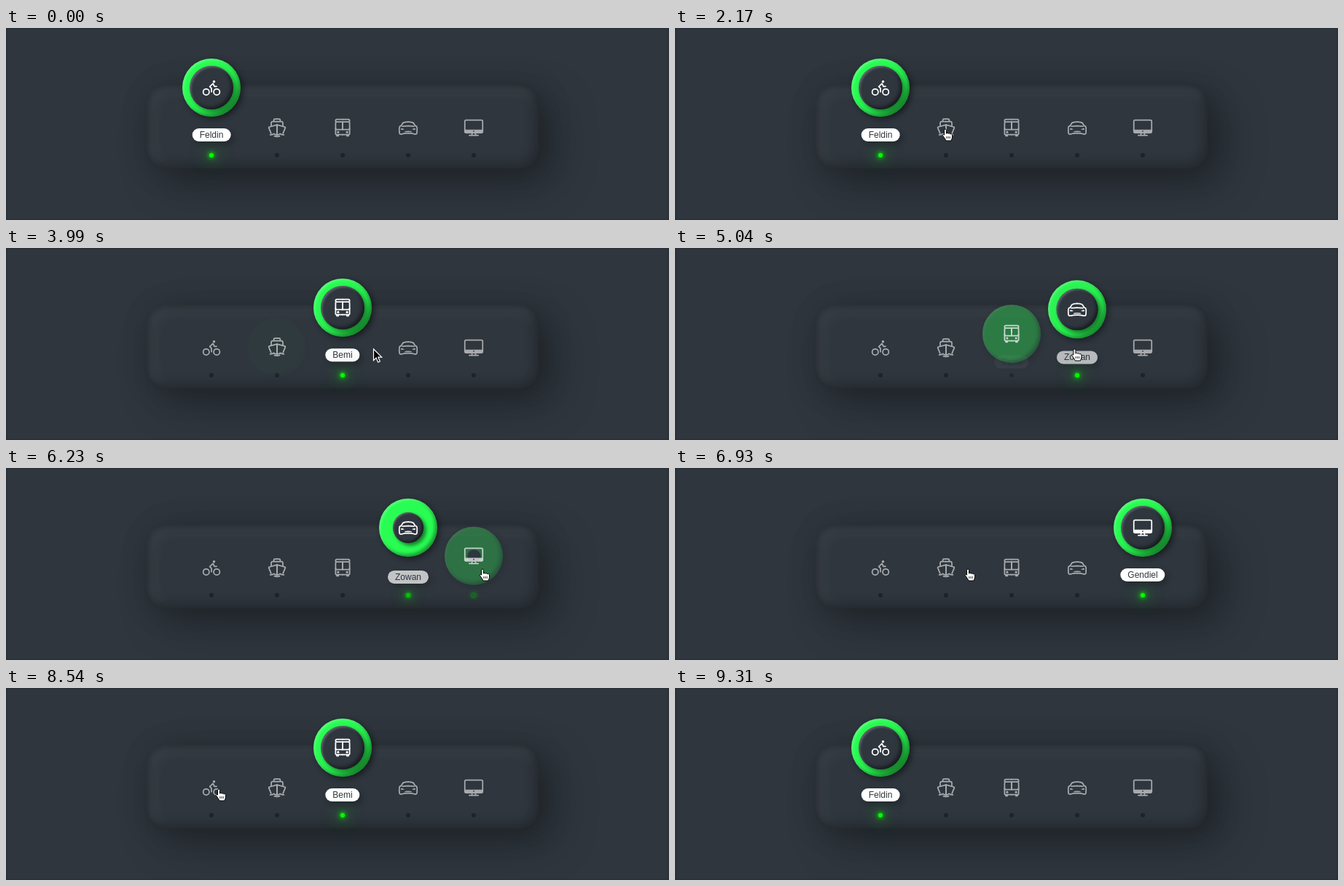
Recreate the animation shown at these times as an HTML page. Size 910 by 264 pixels, loop 9.73 s.

```html
<!DOCTYPE html>
<html lang="en">
<head>
<meta charset="utf-8">
<title>Dock menu</title>
<style>
  html, body { margin: 0; width: 100%; height: 100%; overflow: hidden; background: #2f363e; }
  .stage { position: relative; width: 910px; height: 264px; overflow: hidden; background: #2f363e;
    box-shadow: inset 0 0 3px rgba(0,0,0,.3); }
  .panel { position: absolute; left: 193px; top: 78px; width: 538px; height: 115px; border-radius: 25px;
    background: #2f363e;
    box-shadow: 22px 22px 60px rgba(0,0,0,.25), 6px 6px 40px rgba(0,0,0,.2),
      inset 3px 3px 8px rgba(0,0,0,.22), inset 5px 5px 24px rgba(255,255,255,.08),
      inset -5px -5px 15px rgba(0,0,0,.35); }
  .item, .item > *, .ring, .core, .icon { position: absolute; }
  .item { top: 0; width: 0; height: 264px; }
  .label { left: 0; top: 138px; height: 18px; padding: 0 10px; border-radius: 9px; background: #fff;
    color: #2f363e; font: 12px/18px "Liberation Sans", Arial, sans-serif; white-space: nowrap;
    box-shadow: 4px 4px 8px rgba(0,0,0,.25); }
  .dot { left: -3px; top: 171.5px; width: 6px; height: 6px; border-radius: 50%; }
  .mover { left: 0; top: 137px; }
  .ring { left: -40px; top: -40px; width: 80px; height: 80px; border-radius: 50%; background: #29fd53;
    box-shadow: 3px 3px 8px rgba(0,0,0,.45), inset 2px 2px 3px rgba(255,255,255,.25),
      inset -3px -3px 5px rgba(0,0,0,.4); }
  .core { left: 10px; top: 10px; width: 60px; height: 60px; border-radius: 50%; background: #2f363e;
    box-shadow: 5px 5px 8px rgba(0,0,0,.5), inset 2px 2px 3px rgba(255,255,255,.25),
      inset -3px -3px 5px rgba(0,0,0,.5); }
  .icon { left: -14px; top: -14px; width: 28px; height: 28px; fill: none; stroke: #fff; stroke-width: 32;
    stroke-linecap: round; stroke-linejoin: round; }
  .icon .solid { fill: #fff; stroke: none; }
  .cursor { position: absolute; left: 0; top: 0; width: 910px; height: 264px; }
</style>
</head>
<body>
<div class="stage" id="stage"><div class="panel"></div></div>
<script>
const LOOP = 9730, STEP = 70;
const DURATION = 500, DELAY = 180, RISE = 55;
const LEAVE = 280, TRAVEL = 620, POINTER_Y = 139;

// Draws the left half of a symmetric icon and its reflection.
const mirror = half => `${half}<g transform="matrix(-1 0 0 1 512 0)">${half}</g>`;

const menu = [
  ['Feldin', `<circle cx="388" cy="364" r="76"/><circle cx="124" cy="364" r="76"/>
    <path d="M256 360v-86l-42-42 80-80 36 72h54"/><circle class="solid" cx="320" cy="104" r="32"/>`],
  ['Pelno', mirror(`<path d="M256 40h-56q-24 0-24 24v40M256 104H150q-40 0-40 40v70"/>
    <path d="M256 186L66 238q-22 6-16 26l56 136M256 186v226"/>
    <path d="M84 436q54 0 94-26 36 30 78 30M190 468q30 12 66 12"/>`)],
  ['Bemi', mirror(`<path d="M256 48H112a32 32 0 0 0 0 64h144v192H112q-32 0-32-32V144q0-32 32-32"/>
    <path d="M80 272v128q0 32 32 32h144M112 432v32h36v-32"/>
    <circle class="solid" cx="144" cy="368" r="28"/>`)],
  ['Zowan', mirror(`<path d="M256 112c-30 0-88 4-117 18s-38 50-50 68-40 20-47 34-11 46-10 86
      q2 60 8 84 4 14 20 14h40c24 0 16-20 156-20M256 214q-90 0-144 10"/>
    <path class="solid" d="M78 268q50 4 82 28-10 16-82 14zM256 340q-70 0-84 12l-12 20q50-8 96-8z"/>`)],
  ['Gendiel', `<rect x="32" y="64" width="448" height="320" rx="32"/>
    <path d="M304 448l-8-64h-80l-8 64M368 448H144"/>
    <path class="solid" fill-rule="evenodd" d="M32 304v80h448v-80zM256 330a16 16 0 1 1 0 32 16 16 0 0 1 0-32z"/>`]
];

// What is chosen when, where the pointer rests on it, and how far it swings wide afterwards.
const clicks = [
  { time: 0, item: 0 },
  { time: 2170, item: 1, dx: 0 },
  { time: 3400, item: 2, dx: 4 },
  { time: 4670, item: 3, dx: -9 },
  { time: 6130, item: 4, dx: 13, swing: -130 },
  { time: 7330, item: 2, dx: -10 },
  { time: 8540, item: 0, dx: 11 }
];

const stage = document.getElementById('stage');
const centre = i => 282 + 90 * i;

const rests = clicks.slice(1).map(c => ({ x: centre(c.item) + c.dx, y: POINTER_Y }));
const stops = [{ x: 425, y: 275 }, ...rests, { x: 345, y: 310 }];

const items = menu.map(([name, art], i) => {
  const el = document.createElement('div');
  el.className = 'item';
  el.style.left = centre(i) + 'px';
  el.innerHTML = `<div class="label">${name}</div><div class="dot"></div>
    <div class="mover"><div class="ring"><div class="core"></div></div>
    <svg class="icon" viewBox="0 0 512 512">${art}</svg></div>`;
  stage.append(el);
  const part = {};
  for (const key of ['label', 'dot', 'mover', 'ring', 'core', 'icon'])
    part[key] = el.querySelector('.' + key).style;
  return part;
});

stage.insertAdjacentHTML('beforeend', `<svg class="cursor">
  <g id="hand" fill="#fff" stroke="#000" stroke-linejoin="round">
    <path d="M-1 0q1.500 0 1.500 1.500V6q2-1.500 2.700.2 2-1.200 2.700.6 2-1 2.600 1v3q0 2-1.500 5.200H0
      q-1-2.500-4.700-7.300 0-2.500 2.200-.6V1.500Q-2.500 0-1 0z"/>
    <path d="M.8 10v3M3 10v3M5.200 10v3" stroke-width=".8"/>
  </g>
  <path id="arrow" d="M0 0v15.500l3.600-3.400 2.500 5.900 2.700-1.100-2.500-5.800h4.900z" stroke="#fff" stroke-width="1.2"/>
</svg>`);
const hand = document.getElementById('hand');
const arrow = document.getElementById('arrow');

const mix = (a, b, p) => a + (b - a) * p;
const clamp = x => Math.min(1, Math.max(0, x));
const smooth = u => u * u * (3 - 2 * u);
const bezier = (a, b, u) => 3 * a * u * (1 - u) ** 2 + 3 * b * u * u * (1 - u) + u ** 3;

// The CSS "ease" curve.
function ease(x) {
  x = clamp(x);
  let lo = 0, hi = 1;
  for (let n = 0; n < 24; n++) {
    const mid = (lo + hi) / 2;
    if (bezier(.25, .25, mid) < x) lo = mid; else hi = mid;
  }
  return bezier(.1, 1, hi);
}

function drawItems(t, k) {
  const { time, item } = clicks[k];
  const previous = k ? clicks[k - 1].item : -1;
  const run = delay => k ? ease((t - time - delay) / DURATION) : 1;

  items.forEach((part, i) => {
    const amount = (inDelay, outDelay) =>
      i === item ? run(inDelay) : i === previous ? 1 - run(outDelay) : 0;
    const lift = amount(0, DELAY), glow = amount(0, 0), tag = amount(DELAY, 0);

    part.mover.transform = `translateY(${-RISE * lift}px)`;
    part.ring.opacity = lift;
    part.core.transform = `scale(${glow})`;
    part.icon.opacity = mix(.58, 1, lift);
    part.label.opacity = tag;
    part.label.transform = `translate(-50%, ${10 * (1 - tag)}px)`;
    part.dot.background = `rgb(${mix(30, 0, glow)},${mix(35, 255, glow)},${mix(42, 0, glow)})`;
    part.dot.boxShadow = [5, 10, 20, 30]
      .map(blur => `0 0 ${blur * glow}px rgba(0,255,0,${glow})`).join();
  });
}

function drawCursor(t, k) {
  const u = clamp((t - clicks[k].time - LEAVE) / TRAVEL), p = smooth(u);
  const from = stops[k], to = stops[k + 1];
  const x = mix(from.x, to.x, p) + (clicks[k].swing || 0) * Math.sin(Math.PI * u);
  const y = mix(from.y, to.y, p);
  const over = items.some((_, i) => Math.abs(x - centre(i)) < 40) && y < 190;
  for (const el of [hand, arrow]) el.setAttribute('transform', `translate(${x} ${y})`);
  hand.style.display = over ? '' : 'none';
  arrow.style.display = over ? 'none' : '';
}

const origin = performance.now();
function frame() {
  const elapsed = (performance.now() - origin) % LOOP;
  const t = Math.floor(elapsed / STEP) * STEP;
  const k = clicks.findLastIndex(c => c.time <= t);
  drawItems(t, k);
  drawCursor(t, k);
  requestAnimationFrame(frame);
}
frame();
</script>
</body>
</html>
```
